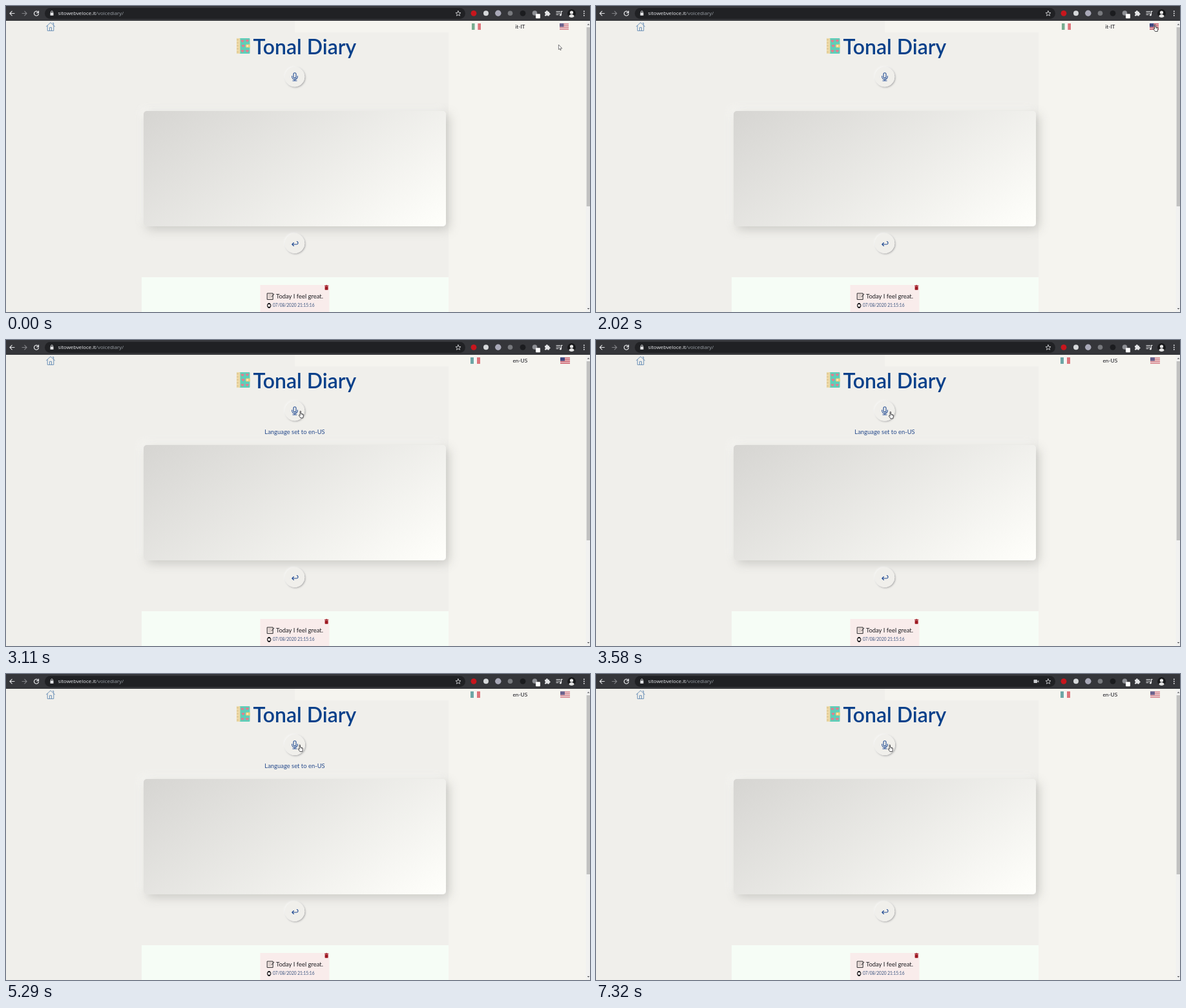
Recreate the animation shown at these times as an HTML page with a canvas. Size 904 by 475 pixels, loop 8 s.

```html
<!DOCTYPE html>
<html lang="en">
<head>
<meta charset="utf-8">
<title>Tonal Diary</title>
<style>
html, body { margin: 0; width: 100%; height: 100%; overflow: hidden; background: #f0efeb; }
canvas { display: block; width: 904px; height: 475px; }
</style>
</head>
<body>
<canvas id="stage" width="904" height="475"></canvas>
<script>
const ctx = document.getElementById('stage').getContext('2d');
const LOOP = 8000;
const LATO = 'Lato, sans-serif';
const NAVY = '#08408a';
const PAGE = '#f0efeb';

// time, x, y, pointing hand?
const moves = [
  [0, 855, 60, 0], [160, 856.5, 59, 0], [620, 857.5, 51, 0], [1240, 861, 44, 0],
  [1390, 864.5, 38, 0], [1540, 864, 33, 1], [1710, 863, 30, 1], [1870, 863, 29, 1],
  [2020, 862.5, 28.5, 1], [2180, 863, 22, 1], [2330, 863, 24, 1], [2480, 862, 28, 1],
  [2640, 862, 29, 1], [2790, 864, 30, 1], [2960, 488, 109, 0], [3110, 453, 110, 1],
  [3260, 453.5, 111, 1], [3430, 454, 112, 1], [3580, 453, 111, 1], [3900, 452.5, 110, 1],
  [4050, 452, 109.5, 1]
];

const ramp = (t, a, b) => {
  const k = Math.min(1, Math.max(0, (t - a) / (b - a)));
  return k * k * (3 - 2 * k);
};

function rect(x, y, w, h, color, r = 0) {
  ctx.fillStyle = color;
  ctx.beginPath();
  ctx.roundRect(x, y, w, h, r);
  ctx.fill();
}

function dot(x, y, r, color) {
  ctx.fillStyle = color;
  ctx.beginPath();
  ctx.arc(x, y, r, 0, 7);
  ctx.fill();
}

function text(str, x, y, font, color, align = 'left') {
  ctx.font = font;
  ctx.fillStyle = color;
  ctx.textAlign = align;
  ctx.fillText(str, x, y);
}

function shape(x, y, d, fill, stroke, width = 1, scale = 1) {
  const p = new Path2D(d);
  ctx.save();
  ctx.translate(x, y);
  ctx.scale(scale, scale);
  ctx.lineCap = ctx.lineJoin = 'round';
  if (fill) { ctx.fillStyle = fill; ctx.fill(p); }
  if (stroke) { ctx.strokeStyle = stroke; ctx.lineWidth = width; ctx.stroke(p); }
  ctx.restore();
}

function shadowed(dx, dy, blur, color, draw) {
  ctx.save();
  ctx.shadowOffsetX = dx;
  ctx.shadowOffsetY = dy;
  ctx.shadowBlur = blur;
  ctx.shadowColor = color;
  draw();
  ctx.restore();
}

function toolbar(recording) {
  rect(0, 0, 904, 23, '#35363a');
  rect(60, 3, 651, 17, '#202124', 8.5);
  const pale = '#e3e4e6';
  shape(9.5, 11.5, 'M3.5 0H-3.5M-.3-3.3L-3.6 0L-.3 3.3', null, pale, 1.1);
  shape(28.5, 11.5, 'M-3.5 0H3.5M.3-3.3L3.6 0L.3 3.3', null, '#818286', 1.1);
  shape(47, 11.5, 'M2.6-2.2A3.5 3.5 0 1 0 3.4.8M3.5-3.7V-.8H.6', null, pale, 1.2);
  shape(71, 11.5, 'M-1.5-1V-2.2A1.5 1.5 0 0 1 1.5-2.2V-1', null, pale, .9);
  rect(68.5, 10.3, 5, 4.5, pale, .6);

  const host = 'sitowebveloce.it', font = '7.9px "Open Sans", sans-serif';
  text(host, 80.5, 14, font, '#e8eaed');
  text('/voicediary/', 80.5 + ctx.measureText(host).width, 14, font, '#9aa0a6');

  if (recording) {
    rect(677.5, 8.8, 5.5, 5.2, '#c9cbce', .7);
    shape(683, 11.4, 'M0 0L2.3-2V2Z', '#c9cbce');
  }
  shape(700, 11.6, 'M0-4L1.1-1.3L4-1.1L1.8.8L2.5 3.6L0 2.1L-2.5 3.6L-1.8.8L-4-1.1L-1.1-1.3Z', null, pale, .8);

  dot(724, 11.3, 4.4, '#c8161d');
  dot(743, 11.3, 4, '#d6d8da');
  dot(761.8, 11.3, 4.7, '#a9a9b8');
  dot(780.5, 11.3, 3.8, '#77797d');
  dot(800, 11.3, 4.4, '#1b1c1f');
  dot(818.5, 11, 3.8, '#8d8f94');
  rect(820, 12.3, 7, 7, '#fff', 1);

  rect(834, 8.8, 7, 6.8, pale, .8);
  dot(837.3, 8.5, 1.5, pale);
  dot(841, 12.2, 1.5, pale);
  dot(834.2, 12.4, 1, '#35363a');
  dot(837.4, 15.5, 1, '#35363a');
  shape(852, 8.5, 'M0 0H5.8M0 2.5H5.8M0 5H3M7.5 5V-.1H9', null, pale, 1.2);
  dot(858.4, 13.8, 1.6, pale);

  ctx.save();
  ctx.beginPath();
  ctx.arc(875.5, 11.5, 6.4, 0, 7);
  ctx.clip();
  rect(869, 5, 13, 13, '#17181a');
  dot(875.5, 10, 2.6, '#e4e4e4');
  dot(875.5, 17.4, 4.4, '#e4e4e4');
  ctx.restore();
  for (const y of [8.3, 11.5, 14.7]) dot(894.8, y, .95, pale);
}

function scrollbar() {
  rect(897.5, 23, 6.5, 452, '#f1f1f0');
  rect(898.7, 33, 5.3, 278, '#c1c1c0');
  shape(901.5, 28.5, 'M-1.8 1L0-1L1.8 1Z', '#55565a');
  shape(901.5, 470, 'M-1.8-1L0 1L1.8-1Z', '#505155');
}

function flags(t) {
  const english = t >= 2330;
  const glow = ramp(t, 1540, 1900) * (1 - ramp(t, 2960, 3750));
  const w = english ? 15 : 14, it = english ? 719 : 721, us = english ? 858 : 857;
  ctx.save();
  ctx.globalAlpha = .65;
  rect(it, 27, w / 3, 10, english ? '#267d80' : '#35865c');
  rect(it + w / 3, 27, w / 3, 10, '#f7f7f7');
  rect(it + w * 2 / 3, 27, w / 3, 10, '#d3303c');
  ctx.globalAlpha = .7 + .3 * glow;
  rect(us, 27, w, 10, '#f4eeee');
  for (let i = 0; i < 7; i++) rect(us, 27 + i * 20 / 13, w, 10 / 13, '#c23545');
  rect(us, 27, w * .46, 5.4, '#303a78');
  for (let i = 0; i < 6; i++) dot(us + 1.2 + i % 3 * 2.1, 28.4 + (i / 3 | 0) * 2.4, .35, '#fff');
  ctx.restore();
  text(english ? 'en-US' : 'it-IT', 795.8, 34.8, `8.3px ${LATO}`, '#15151c', 'center');
}

function diary() {
  rect(357, 50, 20.5, 24, '#5ecfb9', 1);
  rect(357, 50, 5.5, 24, '#eed9a6', 1);
  for (let i = 0; i < 5; i++) rect(357, 52 + i * 4.7, 3, .8, '#d0b680');
  const heart = 'M0 2.6L-2.7-.3C-3.5-2-1-3.2 0-1.2C1-3.2 3.5-2 2.7-.3Z';
  for (const [x, y] of [[366, 54.5], [373.5, 54], [367, 62], [366, 70], [373.5, 70]])
    shape(x, y, heart, '#e9788c', null, 1, .85);
  rect(371, 59.5, 7, 5, '#f2ce7a', 1.5);
  dot(373.7, 62, 1.2, '#fff3d0');
}

function button(x, y, scale, icon) {
  ctx.save();
  ctx.translate(x, y);
  ctx.scale(scale, scale);
  const disc = () => dot(0, 0, 15.2, PAGE);
  shadowed(1, 1, 3, 'rgba(105,105,110,.6)', disc);
  shadowed(-1, -1, 2.5, 'rgba(255,255,255,.7)', disc);
  disc();
  ctx.restore();
  icon(x, y);
}

function mic(x, y) {
  shape(x, y, 'M-2-4.2A2 2 0 0 1 2-4.2V-.2A2 2 0 0 1-2-.2ZM-4.3-1.2V-.3A4.3 4.3 0 0 0 4.3-.3V-1.2M0 4V6M-3 6H3', null, '#214b93', 1.1);
}

function enter(x, y) {
  shape(x, y + .3, 'M3.4-3.2C6-2 5.6 1.2 2.6 1.2H-4M-1.6-1.3L-4.2 1.2L-1.6 3.7', null, '#214b93', 1.1);
}

function textArea() {
  const box = c => rect(213, 163, 468, 179, c, 5);
  shadowed(-5, -5, 12, 'rgba(250,250,247,.7)', () => box(PAGE));
  shadowed(5, 5, 16, 'rgba(150,150,146,.42)', () => box(PAGE));
  // 145deg fill across the box
  const a = 145 * Math.PI / 180, sx = Math.sin(a), sy = -Math.cos(a);
  const half = (468 * sx + 179 * sy) / 2;
  const g = ctx.createLinearGradient(447 - sx * half, 252.5 - sy * half, 447 + sx * half, 252.5 + sy * half);
  g.addColorStop(0, '#d6d5d2');
  g.addColorStop(1, '#fffffb');
  box(g);
}

function entry() {
  rect(210, 421, 475, 54, '#f6fdf6');
  rect(393.5, 433, 107, 42, '#f9eceb');
  rect(493.6, 435.3, 5, 5.5, '#9d1720', .7);
  rect(493, 433.8, 6.2, 1, '#9d1720');
  rect(494.9, 433.2, 2.4, .9, '#9d1720');
  shape(404, 445, 'M.6 1H9.2V10.6H.6Z', '#f4e6e2', '#2c2c2f', 1);
  shape(404, 445, 'M2.5 3.4H7M2.5 5.4H6.4M2.5 7.4H5.5', null, '#a09897', .6);
  shape(404, 445, 'M11 2.2L7.2 6.4', null, '#2c2c2f', 1);
  text('Today I feel great.', 418, 453.6, `9.42px ${LATO}`, '#1c1c20');
  rect(405.5, 461, 3.4, 8, '#1d1d20', .6);
  dot(407.2, 465, 3.2, '#1d1d20');
  dot(407.2, 465, 2.1, '#f9eceb');
  text('07/08/2020 21:15:16', 413, 467.3, `6.6px ${LATO}`, '#39537f');
}

function cursor(t) {
  const [, x, y, hand] = moves.findLast(m => m[0] <= t);
  if (hand) {
    shape(x, y, 'M2 1C2-.1 3.5-.1 3.5 1V4.3L6.6 5C7.5 5.3 7.7 5.9 7.5 6.8L6.7 11H3L.5 7.5C0 6.4 1 5.9 1.6 6.6L2 7Z', '#fff', '#202024', .8);
    shape(x, y, 'M5 5V6.4M6.3 5.3V6.5', null, '#202024', .5);
  } else {
    shape(x, y, 'M.4.4V7.6L2 6.2L3.1 8.7L4.2 8.2L3.1 5.8H5.4Z', '#fff', '#2b2b30', .6);
  }
}

function draw(t) {
  rect(0, 0, 904, 475, PAGE);
  rect(447, 23, 457, 18, '#f5f4ef');
  rect(685, 23, 219, 452, '#f5f4ef');
  toolbar(t >= 5460);
  shape(69, 32, 'M-6.6-.2L0-6.3L6.6-.2M-4.8-1.4V6.4H4.8V-1.4M-1.5 6.2V1.3H1.5V6.2M3.3-5.6H4.7V-2.6', null, '#6d92b8', 1);
  flags(t);
  diary();
  text('Tonal Diary', 382.5, 74.5, `600 32px ${LATO}`, NAVY);
  button(447, 110, 1 + .05 * ramp(t, 3110, 4050), mic);
  const message = t < 2330 || t >= 7320 ? '' : t < 5460 ? 'Language set to en-US' : 'Start Recognition';
  textArea();
  text(message, 447, 145.7, `9.42px ${LATO}`, '#254a8c', 'center');
  button(447, 368.5, 1, enter);
  entry();
  scrollbar();
  cursor(t);
}

function frame(now) {
  draw(now % LOOP);
  requestAnimationFrame(frame);
}
requestAnimationFrame(frame);
</script>
</body>
</html>
```
